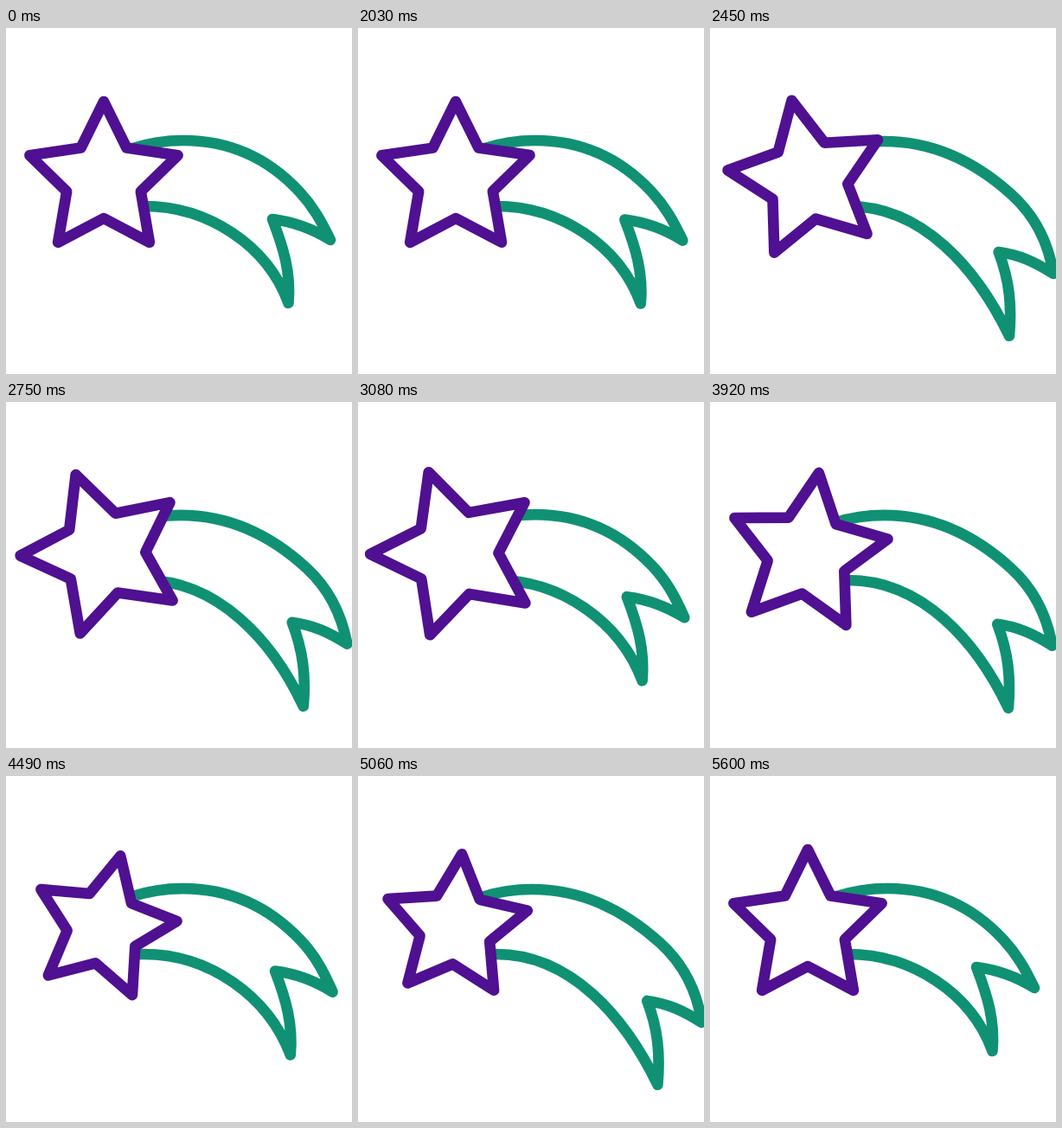
These frames come from a looping animation (400 px wide and 400 px high, 5630 ms). An HTML page with a canvas:

```html
<!DOCTYPE html>
<html lang="en">
<head>
<meta charset="utf-8">
<title>Shooting star</title>
<style>
html, body { margin: 0; width: 100%; height: 100%; overflow: hidden; background: #fff; }
canvas { display: block; width: 400px; height: 400px; }
</style>
</head>
<body>
<canvas id="stage" width="400" height="400"></canvas>
<script>
const ctx = document.getElementById('stage').getContext('2d');
const LOOP = 5630, REST = 2000, STEP = 30, SWING = 1200;
const PURPLE = '#4f1091', GREEN = '#109173';
const LINE = 12.6, HANDLE = 0.36;
const CENTER = { x: 113, y: 175 }, RADIUS = 90;

const radians = degrees => degrees * Math.PI / 180;
const smooth = u => u * u * (3 - 2 * u);
const ramp = (time, from, to) =>
  smooth(Math.min(1, Math.max(0, (time - from) / (to - from))));

const starAngle = t =>
  -20 * ramp(t, 0, 820) + 34 * ramp(t, 900, 2300) - 14 * ramp(t, 2300, 3550);

const starScale = t =>
  1 + 0.1 * ramp(t, 0, 1150) - 0.18 * ramp(t, 1400, 2800) + 0.08 * ramp(t, 2800, 3500);

// The tail drops quickly and rises back evenly, three times per loop.
function tailDrop(time) {
  const u = (time % SWING) / (SWING / 2);
  return u < 1 ? smooth(1 - (1 - u) ** 1.45) : 1 - smooth(u - 1);
}

// Cubic that leaves and arrives at the given angles
function curve(from, leave, to, arrive) {
  const reach = HANDLE * Math.hypot(to.x - from.x, to.y - from.y);
  const a = radians(leave), b = radians(arrive);
  ctx.bezierCurveTo(
    from.x + reach * Math.cos(a), from.y + reach * Math.sin(a),
    to.x - reach * Math.cos(b), to.y - reach * Math.sin(b),
    to.x, to.y
  );
}

function drawTail(drop) {
  const moved = (x, y, dx = 0, dy = 0) => ({ x: x + dx * drop, y: y + dy * drop });
  const top = moved(145, 139.5);
  const shoulder = moved(205, 130, -4, 1);
  const bend = moved(339, 189, 10.5, 4);
  const outerTip = moved(375, 245, 23, 41);
  const notch = moved(308, 221, 27, 40);
  const innerTip = moved(326.5, 318, 20.5, 40);
  const bottom = moved(160, 206);
  const bendAngle = 47 - 5 * drop;

  ctx.beginPath();
  ctx.moveTo(top.x, top.y);
  curve(top, -18, shoulder, 0);
  curve(shoulder, 0, bend, bendAngle);
  curve(bend, bendAngle, outerTip, 64 + 18 * drop);
  curve(outerTip, 212, notch, 187);
  curve(notch, 69, innerTip, 95);
  curve(innerTip, 250 - 6 * drop, bottom, 180);
  ctx.lineTo(148, bottom.y);
  ctx.strokeStyle = GREEN;
  ctx.stroke();
}

function drawStar(degrees, scale) {
  ctx.beginPath();
  for (let i = 0; i < 10; i++) {
    const a = radians(degrees + i * 36);
    const r = RADIUS * scale / (i % 2 ? 2 : 1);
    ctx.lineTo(CENTER.x + r * Math.sin(a), CENTER.y - r * Math.cos(a));
  }
  ctx.closePath();
  ctx.fillStyle = '#fff';
  ctx.fill();
  ctx.strokeStyle = PURPLE;
  ctx.stroke();
}

function draw(now) {
  const time = Math.max(0, Math.floor((now % LOOP - REST) / STEP) * STEP);
  ctx.fillStyle = '#fff';
  ctx.fillRect(0, 0, 400, 400);
  ctx.lineWidth = LINE;
  ctx.lineJoin = ctx.lineCap = 'round';
  drawTail(tailDrop(time));
  drawStar(starAngle(time), starScale(time));
}

const start = performance.now();
function tick() {
  draw(performance.now() - start);
  requestAnimationFrame(tick);
}
tick();
</script>
</body>
</html>
```
